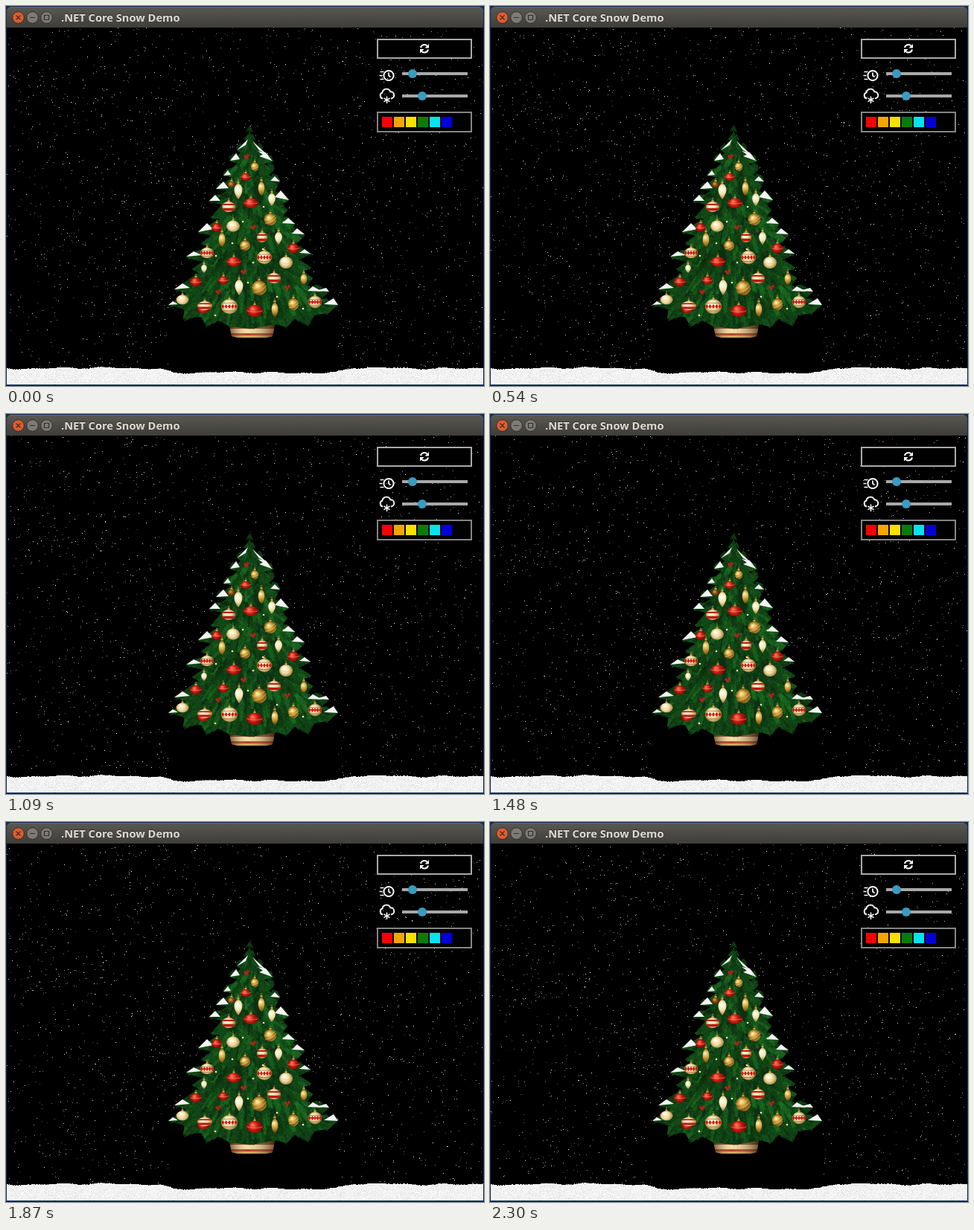
These frames come from a looping animation (642 px wide and 511 px high, 2330 ms). An HTML page with a canvas:

```html
<!DOCTYPE html>
<html lang="en">
<head>
<meta charset="utf-8">
<title>Snow Demo</title>
<style>
  html, body { margin: 0; width: 100%; height: 100%; overflow: hidden; background: #0b2c58; }
  .window { position: relative; width: 642px; height: 511px; overflow: hidden; }
  .bar {
    position: absolute; left: 1px; top: 1px; width: 640px; height: 28px; box-sizing: border-box;
    border-radius: 6px 6px 0 0; border-top: 1px solid #6b6a63;
    background: linear-gradient(#595750, #3e3d39);
  }
  .bar span {
    position: absolute; left: 73px; top: 3px; white-space: pre; color: #dfdbd2;
    font: bold 14.65px/20px "Open Sans", "Noto Sans", sans-serif;
    text-shadow: 0 -1px #2b2a27;
  }
  canvas, svg { position: absolute; left: 0; top: 0; }
</style>
</head>
<body>
<div class="window">
  <canvas id="scene" width="642" height="511"></canvas>
  <div class="bar"><span>.NET Core Snow Demo</span></div>
  <svg width="642" height="511" fill="none">
    <g stroke="#302f2b">
      <circle cx="16.500" cy="15.500" r="7.800" fill="#e35c30"/>
      <circle cx="35.500" cy="15.500" r="7.800" fill="#7d7b73"/>
      <circle cx="54.500" cy="15.500" r="7.800" fill="#7d7b73"/>
      <path d="M13.500 12.500l6 6m0-6l-6 6M32 15.500h7M51.500 12.500h6v6h-6z" stroke-width="1.200"/>
    </g>
    <rect x="499" y="45" width="126" height="25" fill="#000" stroke="#a9a9a9" stroke-width="2"/>
    <rect x="499" y="143" width="126" height="26" fill="#000" stroke="#858585" stroke-width="2"/>
    <g stroke="#fff" stroke-width="2">
      <path d="M557 56a5 5 0 0 1 8.500-2.500M567 58.500a5 5 0 0 1-8.500 2.500"/>
      <path d="M568 51v5.500h-5.500zM556 63.500v-5.500h5.500z" fill="#fff" stroke="none"/>
      <circle cx="514" cy="93.500" r="6.600"/>
      <path d="M514 89.500v4l2.500 2M502.500 88.500h5M501.500 93.500h4M502.500 98.500h5" stroke-width="1.700"/>
      <path d="M506 124.500a4.300 4.300 0 0 1-.5-8.200a5.600 5.600 0 0 1 10.800-1a4.600 4.600 0 0 1 .7 9.200" stroke-width="1.900"/>
      <path d="M511.500 121.500v9.500M507.400 124l8.200 4.600M515.600 124l-8.200 4.600" stroke-width="1.500"/>
    </g>
    <path d="M532 91h88M532 121h88" stroke="#a9a9a9" stroke-width="4"/>
    <g fill="#399cc0"><circle cx="546" cy="91" r="6"/><circle cx="559" cy="121" r="6"/></g>
    <path d="M505 149h14v14h-14z" fill="#fb0000"/>
    <path d="M521 149h14v14h-14z" fill="#f6a500"/>
    <path d="M537 149h14v14h-14z" fill="#f6e000"/>
    <path d="M553 149h14v14h-14z" fill="#087c08"/>
    <path d="M569 149h14v14h-14z" fill="#00e4f2"/>
    <path d="M585 149h14v14h-14z" fill="#0000df"/>
  </svg>
</div>
<script>
const W = 642, H = 511, TOP = 29, FLOOR = 509, LOOP = 2330;
const TAU = Math.PI * 2;

let seed = 20171;
function rnd() {
  seed = (seed * 1664525 + 1013904223) >>> 0;
  return seed / 4294967296;
}

function layer() {
  const c = document.createElement('canvas');
  c.width = W;
  c.height = H;
  return c.getContext('2d', { willReadFrequently: true });
}

function poly(g, p, fill) {
  g.beginPath();
  for (let i = 0; i < p.length; i += 2) g.lineTo(p[i], p[i + 1]);
  g.closePath();
  if (fill) { g.fillStyle = fill; g.fill(); }
}

// ---- tree ----
const tree = layer();

const leftEdge = [
  327,168, 323,181, 311,194, 316,198, 301,208, 311,212, 292,228, 305,230, 282,246,
  296,249, 273,263, 290,267, 275,285, 287,286, 258,304, 276,309, 262,320, 272,323,
  242,338, 264,344, 250,354, 260,360, 246,367, 226,381, 242,386, 218,402, 240,408, 238,420];
const bottomEdge = [
  262,418, 268,429, 286,423, 300,431, 330,434, 362,428, 378,431, 388,420, 408,427, 414,416, 434,412];
const rightEdge = [
  446,402, 424,393, 434,384, 405,376, 412,366, 398,357, 410,352, 392,342, 409,333,
  388,322, 401,308, 382,303, 388,293, 371,283, 378,275, 367,268, 380,261, 361,249,
  368,236, 353,227, 360,220, 346,212, 358,209, 340,196, 343,193, 331,180];
const outline = [...leftEdge, ...bottomEdge, ...rightEdge];

const caps = [
  301,208, 309,198, 314,206, 292,228, 298,221, 302,227, 282,246, 292,236, 299,245,
  273,262, 281,254, 288,262, 258,304, 270,292, 278,300, 242,337, 252,330, 263,335,
  226,381, 237,373, 247,379, 218,402, 224,397, 231,401, 310,194, 325,179, 322,187,
  331,182, 350,199, 340,194, 338,195, 349,197, 358,209, 340,202, 349,198, 357,208,
  355,235, 361,229, 368,236, 361,257, 369,248, 380,261, 371,292, 379,285, 388,293,
  384,306, 391,299, 401,307, 394,332, 401,327, 409,333, 405,383, 412,377, 425,384,
  416,383, 430,379, 434,384, 427,401, 440,393, 446,402];

// A drooping twig with needles on both sides.
function frond(x, y, a, len, light) {
  const g = tree, bend = 0.012 * Math.cos(a);
  g.lineWidth = 0.9;
  for (let s = 0; s < len; s += 1.3) {
    const n = (3 + 5 * (1 - s / len)) * (0.7 + rnd() * 0.5);
    g.strokeStyle = `hsl(${116 + rnd() * 18},${50 + rnd() * 18}%,${light + rnd() * 9}%)`;
    g.beginPath();
    for (const side of [-0.5, 0.5]) {
      g.moveTo(x, y);
      g.lineTo(x + n * Math.cos(a + side), y + n * Math.sin(a + side));
    }
    g.stroke();
    x += 1.3 * Math.cos(a);
    y += 1.3 * Math.sin(a);
    a += bend;
  }
}

function pot() {
  const g = tree;
  g.save();
  poly(g, [299,424, 362,424, 358,444, 350,446, 311,446, 303,444]);
  g.clip();
  for (const [y, h, c] of [[424, 10, '#6a3c10'], [434, 6, '#f0d9a0'], [440, 3, '#a52a0c'], [443, 3, '#c89848']]) {
    g.fillStyle = c;
    g.fillRect(299, y, 64, h);
  }
  const s = g.createLinearGradient(299, 0, 362, 0);
  s.addColorStop(0, 'rgba(60,20,0,.7)');
  s.addColorStop(0.4, 'rgba(255,240,200,.15)');
  s.addColorStop(1, 'rgba(60,20,0,.75)');
  g.fillStyle = s;
  g.fillRect(299, 424, 64, 24);
  g.restore();
}

function foliage() {
  const g = tree;
  g.save();
  poly(g, outline, '#0b3011');
  g.clip();
  for (let y = 426; y > 170; y -= 2) {
    const half = (y - 166) * 0.45, mid = 327 + (y - 168) * 0.02;
    for (let k = 0; k < 2 + half / 26; k++) {
      const u = rnd() * 2 - 1;
      const light = rnd() < 0.3 ? 20 : 9 + rnd() * 5;
      frond(mid + u * half * 0.9, y - 12, Math.PI / 2 - u * 1.05 + rnd() * 0.4 - 0.2, 8 + half * 0.17 + rnd() * 6, light);
    }
  }
  g.restore();
  for (let i = 0; i < outline.length; i += 2) {
    const x = outline[i], y = outline[i + 1];
    const a = Math.atan2(34, x - 330), len = Math.min(22, 5 + Math.abs(x - 328) * 0.2);
    frond(x - (len + 2) * Math.cos(a), y - (len + 2) * Math.sin(a), a, len, 13);
  }
}

// ---- ornaments ----
const GOLD = ['#fff0b0', '#c8942e', '#5c3a08'];
const RED = ['#ff7458', '#c5150f', '#580404'];
const CREAM = ['#fffff2', '#f1e0aa', '#9a722c'];

function shade(x, y, rx, ry, tones) {
  const r = Math.max(rx, ry);
  const f = tree.createRadialGradient(x - rx * 0.3, y - ry * 0.35, 0, x, y, r * 1.1);
  tones.forEach((c, i) => f.addColorStop([0.05, 0.5, 1][i], c));
  return f;
}

function hook(x, y) {
  tree.fillStyle = '#c99a3a';
  tree.fillRect(x - 1.5, y - 2, 3, 2.5);
  tree.fillRect(x - 0.4, y - 5, 0.8, 4);
}

function ball([x, y, rx, ry], tones, detail) {
  const g = tree;
  hook(x, y - ry);
  g.save();
  g.beginPath();
  g.ellipse(x, y, rx, ry, 0, 0, TAU);
  g.fillStyle = shade(x, y, rx, ry, tones);
  g.fill();
  g.clip();
  if (detail) detail(g, x, y, rx, ry);
  g.restore();
}

function drop([x, y, rx, ry], tones, round) {
  const g = tree;
  hook(x, y - ry);
  g.beginPath();
  g.moveTo(x, y - ry);
  g.bezierCurveTo(x + rx * 1.6, y - ry * 0.5, x + rx * 1.3, y + ry * round, x, y + ry);
  g.bezierCurveTo(x - rx * 1.3, y + ry * round, x - rx * 1.6, y - ry * 0.5, x, y - ry);
  g.fillStyle = shade(x, y, rx, ry, tones);
  g.fill();
}

function rim(g, x, y, rx, ry) {
  g.strokeStyle = 'rgba(255,190,110,.55)';
  g.beginPath();
  g.ellipse(x, y - 1, rx, ry * 0.3, 0, 0, Math.PI);
  g.stroke();
}

function swirl(g, x, y, rx, ry) {
  g.strokeStyle = 'rgba(255,232,150,.6)';
  for (let d = -1; d < 2; d++) {
    g.beginPath();
    g.ellipse(x, y + d * ry * 0.6, rx * 1.1, ry * 0.4, -0.5, 0, Math.PI);
    g.stroke();
  }
}

function band(g, x, y, rx, ry) {
  g.fillStyle = '#bd1810';
  g.fillRect(x - rx, y + ry * 0.25, rx * 2, ry * 0.5);
  g.fillRect(x - rx, y - ry * 0.6, rx * 2, ry * 0.3);
}

function diamonds(g, x, y, rx, ry) {
  g.fillStyle = 'rgba(160,70,20,.6)';
  g.fillRect(x - rx, y - ry * 0.5, rx * 2, 1);
  g.fillRect(x - rx, y + ry * 0.55, rx * 2, 1);
  for (let d = -2; d <= 2; d++) {
    const cx = x + d * rx * 0.4;
    poly(g, [cx, y - 3, cx + 2, y, cx, y + 3, cx - 2, y], '#c8180f');
  }
}

function ornaments() {
  const g = tree;
  ball([303, 240, 6, 4], ['#d09a40', '#7c4413', '#341504']);
  ball([265, 408, 8, 5], RED);
  [[322,230,7,5], [329,265,10,6.5], [283,298,7,6], [386,326,8,6.5], [306,344,10,6.5],
   [255,371,8,6], [292,369,7,5.5], [334,410,11,8]].forEach(b => ball(b, RED, rim));
  [[299,270,9,7], [344,311,7,7], [360,366,9,7], [267,403,10,6]].forEach(b => ball(b, CREAM, band));
  [[334,216,5,6], [355,287,8.5,8], [321,322,7,7], [340,379,10,10], [386,401,7,8]].forEach(b => ball(b, GOLD, swirl));
  [[305,296,9,7.5], [376,345,9,8], [237,395,8.5,6.5]].forEach(b => ball(b, CREAM, rim));
  [[270,332,9,7], [347,338,10,9], [300,404,11,10], [415,398,9,8]].forEach(b => ball(b, CREAM, diamonds));
  [[312,249,5,11], [357,260,4.5,9], [366,312,4.5,9], [313,378,5,11], [266,353,3.5,6]].forEach(b => drop(b, CREAM, 0.2));
  [[343,245,4,10], [290,314,4,10], [400,367,4,8], [361,408,4,10]].forEach(b => drop(b, GOLD, 0.6));
  for (const [x, y] of [[323,202], [332,297], [319,357], [285,384], [378,378]]) {
    g.fillStyle = '#d3161a';
    for (const [dx, dy] of [[-2, 0], [2, -1], [0, 2]]) {
      g.beginPath();
      g.arc(x + dx, y + dy, 1.7, 0, TAU);
      g.fill();
    }
  }
  g.fillStyle = '#f3ecc4';
  for (const [x, y] of [[346,270], [373,291], [304,319], [281,416], [399,407], [282,336], [318,290], [332,345], [364,391], [325,372], [345,327]]) {
    g.beginPath();
    g.arc(x, y, 1.3, 0, TAU);
    g.fill();
  }
}

pot();
foliage();
for (let i = 0; i < caps.length; i += 6) poly(tree, caps.slice(i, i + 6), '#f4f4f4');
ornaments();

// ---- ground and snow shadow ----
const alpha = tree.getImageData(0, 0, W, H).data;
const roof = [], ground = [];
for (let x = 0; x < W; x++) {
  let y = 150;
  while (y < H && alpha[(y * W + x) * 4 + 3] < 100) y++;
  const dip = 6 * Math.max(0, Math.min(1, (x - 205) / 20, (466 - x) / 24));
  ground[x] = Math.round(486.5 + dip + 1.2 * Math.sin(x / 17) * Math.sin(x / 41 + 1) + Math.sin(x / 7.3) * 0.7 + rnd() * 0.9);
  roof[x] = Math.min(y, ground[x]);
}

const back = layer();
back.fillStyle = '#0b2c58';
back.fillRect(0, 0, W, H);
back.fillStyle = '#000';
back.fillRect(1, TOP, W - 2, FLOOR - TOP);
for (let x = 1; x < W - 1; x++) {
  for (let y = ground[x]; y < FLOOR; y++) {
    const v = Math.round(y === ground[x] ? 252 : 250 - 36 * rnd() * rnd());
    back.fillStyle = `rgb(${v},${v},${v})`;
    back.fillRect(x, y, 1, 1);
  }
}
back.drawImage(tree.canvas, 0, 0);

// ---- falling snow ----
const flakes = Array.from({ length: 2100 }, () => {
  const v = Math.round(rnd() < 0.55 ? 60 + rnd() * 80 : 140 + rnd() * 115);
  return {
    x: 1 + rnd() * (W - 2), y: rnd() * 465, speed: 1 + rnd(),
    phase: rnd() * TAU, color: `rgb(${v},${v},${v})`
  };
});

// Bursts of steps: first, last, count.
const bursts = [[20, 540, 17], [570, 1090, 17], [1120, 1630, 17], [1660, 2130, 15], [2210, 2300, 4]];
function tickAt(t) {
  let n = 0;
  for (const [a, b, count] of bursts) {
    if (t >= a) n += Math.min(count, 1 + Math.floor((t - a) / (b - a) * (count - 1) + 1e-6));
  }
  return n;
}

const scene = document.getElementById('scene').getContext('2d');
function draw(tick) {
  scene.drawImage(back.canvas, 0, 0);
  for (const f of flakes) {
    const x = Math.floor(f.x + 1.5 * Math.sin(f.phase + tick * 0.35));
    const y = TOP + Math.floor((f.y + f.speed * tick) % 465);
    if (x < 1 || x > W - 2 || y >= roof[x]) continue;
    scene.fillStyle = f.color;
    scene.fillRect(x, y, 1, 1);
  }
}

let shown = -1;
const start = performance.now();
function frame() {
  const tick = tickAt((performance.now() - start) % LOOP);
  if (tick !== shown) draw(shown = tick);
  requestAnimationFrame(frame);
}
frame();
</script>
</body>
</html>
```
